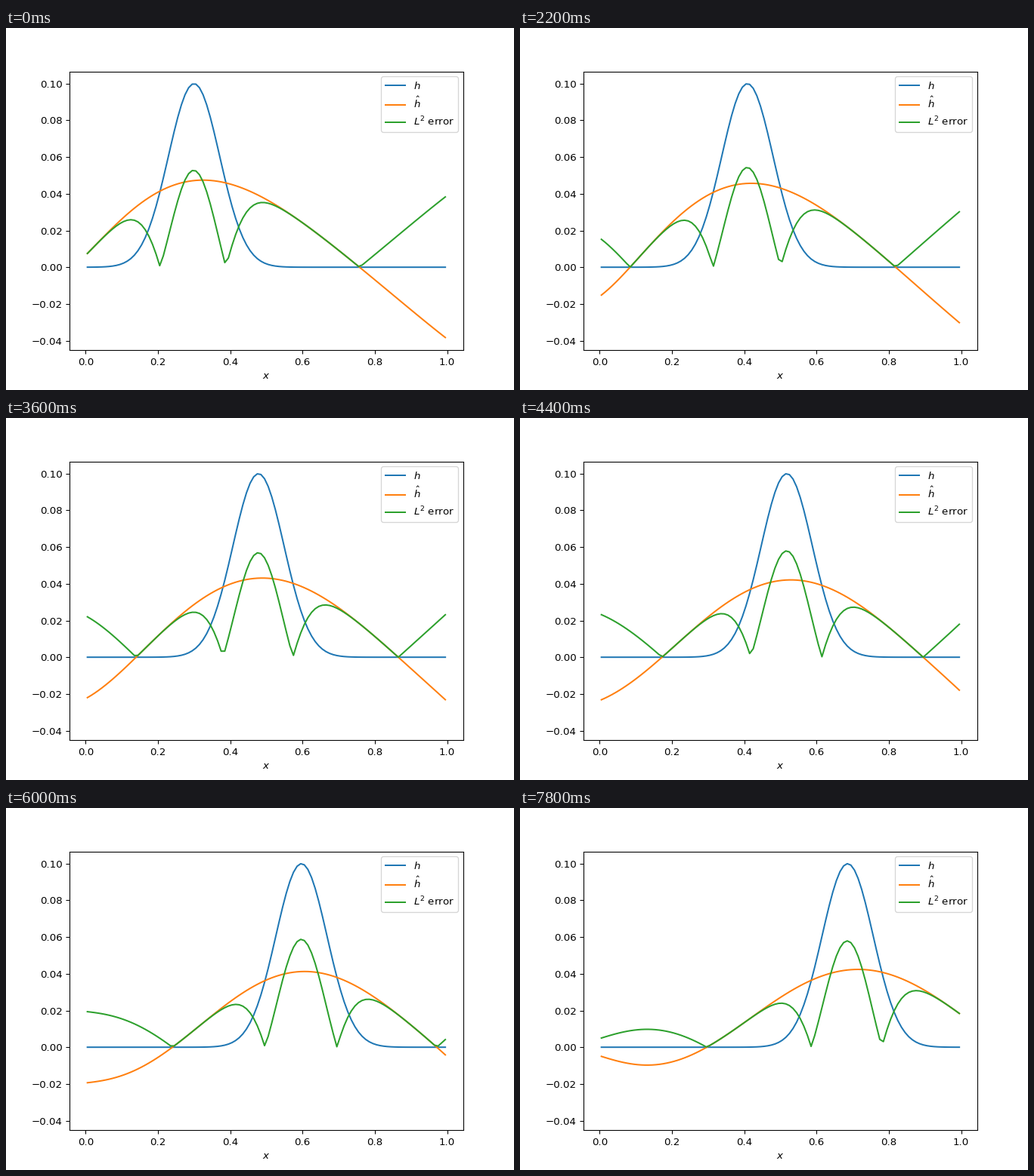
Write a matplotlib script that moves like this. It is 672 px wide and 480 px high and loops after 8000 ms.

```python
import numpy as np
import matplotlib.pyplot as plt
from matplotlib.animation import FuncAnimation

FRAMES = 40
INTERVAL = 200
START, SPEED, WIDTH, HEIGHT = 0.3, 0.0099, 0.1, 0.1

# The approximation is a smooth surface through a few key points.
KEY_STEPS = [0, 11, 26, 39]
KEY_X = [0.005, 0.1, 0.3, 0.5, 0.7, 0.9, 0.995]
KEY_SHAPES = 0.001 * np.array([
    [7.5, 26.2, 47.2, 36.9, 9.2, -23.2, -38.3],
    [-15.2, 3.4, 39.3, 43.1, 19.7, -14.0, -30.2],
    [-22.3, -14.6, 15.3, 39.6, 34.5, 5.2, -11.7],
    [-5.0, -9.4, 0.4, 27.1, 42.3, 30.9, 18.4],
])


def weights(nodes, at):
    """Polynomial interpolation weights, one row per position."""
    powers = len(nodes)
    return np.vander(np.atleast_1d(at), powers) @ np.linalg.inv(np.vander(nodes, powers))


x = (np.arange(100) + 0.5) / 100
X_WEIGHTS = weights(KEY_X, x)


def bump(step):
    center = START + SPEED * step
    return HEIGHT * np.exp(-((x - center) / WIDTH) ** 2)


def approximation(step):
    return X_WEIGHTS @ (weights(KEY_STEPS, step)[0] @ KEY_SHAPES)


fig, ax = plt.subplots(figsize=(7, 5), dpi=96)
labels = ("$h$", r"$\hat{h}$", "$L^2$ error")
lines = [ax.plot(x, 0 * x, label=label)[0] for label in labels]
ax.set_xlim(-0.0445, 1.0445)
ax.set_ylim(-0.0452, 0.10665)
ax.set_xlabel("$x$")
ax.legend(loc="upper right")


def update(step):
    h, h_hat = bump(step), approximation(step)
    for line, y in zip(lines, (h, h_hat, np.abs(h - h_hat))):
        line.set_ydata(y)
    return lines


anim = FuncAnimation(fig, update, frames=FRAMES, interval=INTERVAL,
                     init_func=lambda: update(0), repeat=True, repeat_delay=0)
plt.show()
```
